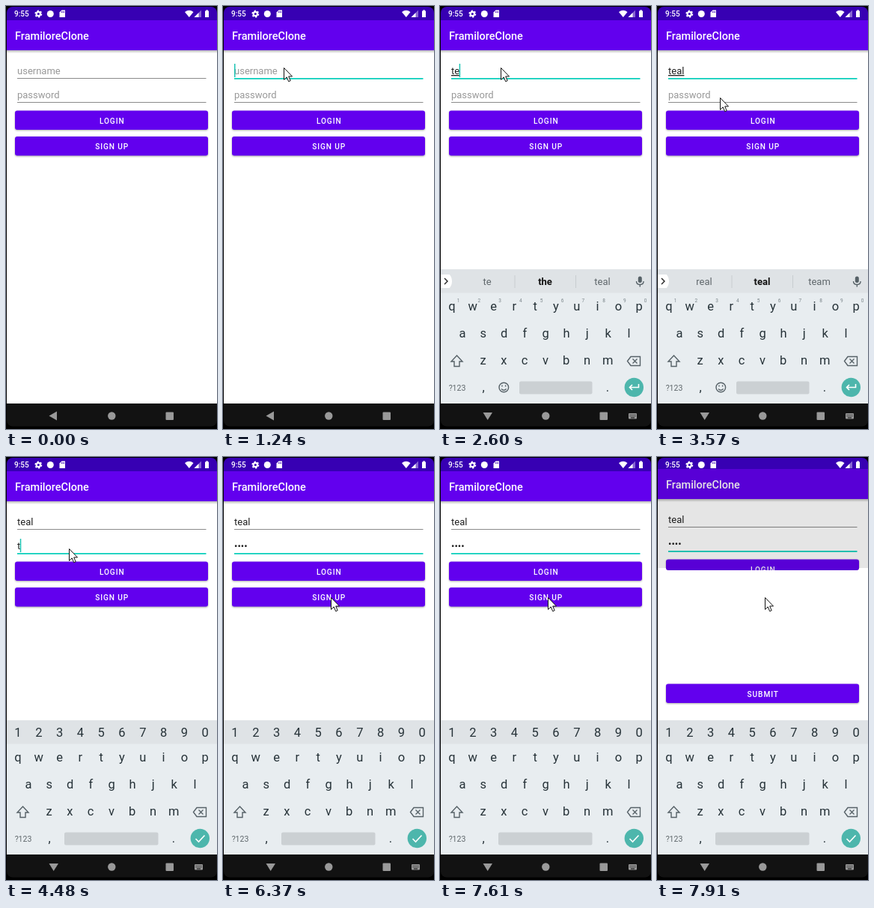
These frames come from a looping animation (282x564 px, 8000 ms). An HTML page:

```html
<!DOCTYPE html>
<html lang="en">
<head>
<meta charset="utf-8">
<style>
  html, body { margin: 0; width: 100%; height: 100%; overflow: hidden; background: #000; }
  svg { display: block; font-family: Roboto, sans-serif; }
  .mid { text-anchor: middle; }
  .title { font-size: 14.5px; font-weight: 500; fill: #fff; }
  .field { font-size: 13px; fill: #202020; }
  .hint { fill: #989898; }
  .button { filter: drop-shadow(0 1px 1px #0005); }
  .label { font-size: 10.15px; font-weight: 500; letter-spacing: .9px; fill: #fff; }
  .key { font-size: 16.5px; fill: #263238; }
  .word { font-size: 13px; fill: #5f676b; }
  .small { font-size: 6.5px; fill: #7c868b; }
  .line { fill: none; stroke: #566167; stroke-width: 1.4; }
</style>
</head>
<body>
<svg width="282" height="564" viewBox="0 0 282 564">
  <defs>
    <clipPath id="glass"><rect x="1" y="1" width="281" height="559.5" rx="8"/></clipPath>
    <linearGradient id="shade" x2="0" y2="1">
      <stop stop-opacity=".28"/><stop offset="1" stop-opacity="0"/>
    </linearGradient>
  </defs>
  <rect width="282" height="564"/>
  <g clip-path="url(#glass)">
    <rect y="16" width="282" height="515" fill="#fff"/>
    <g id="page">
      <rect y="19" width="282" height="40" fill="#6200ee"/>
      <rect y="59" width="282" height="4" fill="url(#shade)"/>
      <text class="title" x="12" y="45">FramiloreClone</text>
      <g id="form"></g>
    </g>

    <g id="next">
      <rect y="16" width="282" height="135" opacity=".1"/>
      <path d="M0 148H12q0 3 3 3H267q3 0 3-3H282V352H0Z" fill="#fff"/>
      <g id="submit"></g>
    </g>

    <g id="status" fill="#fff">
      <rect width="282" height="19" id="statusBar" fill="#3700b3"/>
      <text x="11" y="14" font-size="10" font-weight="500">9:55</text>
      <g fill="none" stroke="#fff">
        <circle cx="43.3" cy="10.5" r="2.7" stroke-width="2.2"/>
        <circle cx="43.3" cy="10.5" r="4.2" stroke-width="1.6" stroke-dasharray="2.2 2.2"/>
      </g>
      <circle cx="59.3" cy="10.5" r="4.5"/>
      <path d="M74.5 5.5H79V15H71.5V8.5Z"/>
      <path d="M74.4 7v2M76 7v2M77.6 7v2" stroke="#3700b3" stroke-width=".8"/>
      <path d="M239 8Q244.800 3.500 250.500 8L244.800 15Z"/>
      <path d="M261 5.500V15H251.500Z" opacity=".4"/>
      <path d="M257.500 9V15H251.500Z"/>
      <path d="M266 6.500H267.500V5.300H269.700V6.500H271V15H266Z"/>
    </g>

    <rect y="530" width="282" height="34" fill="#121212"/>
    <g fill="#999">
      <path id="back"/>
      <circle cx="141.300" cy="546.500" r="5.200"/>
      <rect x="213.500" y="541.500" width="10.500" height="10.500" rx="1"/>
      <g id="switcher">
        <rect x="252" y="543" width="11" height="7.500" rx="1"/>
        <path d="M253.500 545H262M253.500 547H262" stroke="#121212" stroke-dasharray="1 1"/>
        <path d="M255 549H260" stroke="#121212"/>
      </g>
    </g>

    <g id="keyboard">
      <rect y="351" width="282" height="179" fill="#e8edf0"/>
      <rect y="351" width="282" height="31.500" fill="#dfe3e6"/>
      <g id="keys"></g>
      <g class="line">
        <path d="M22.500 466L30 474H26V480.500H19V474H15Z"/>
        <path d="M250.500 473.500L255 467.500H267.500V479.500H255ZM257.500 470.500l6 6m0-6l-6 6"/>
      </g>
      <text class="word mid" x="23" y="513" style="font-size:10.500px">?123</text>
      <text class="key mid" x="58" y="514">,</text>
      <text class="key mid" x="224" y="514">.</text>
      <rect id="space" y="500.500" height="17" rx="2" fill="#cbd0d3"/>
      <circle cx="259.300" cy="508.500" r="12.700" fill="#4db6ac"/>
      <path id="action" fill="none" stroke="#fff" stroke-width="1.600"/>
      <g id="textMode">
        <circle cx="1" cy="367" r="14" fill="#fff" transform="translate(1 0) scale(1 1)" clip-path="inset(5px 0)"/>
        <path d="M6 363L10 367L6 371" class="line" style="stroke:#222"/>
        <path d="M100 359V376M181.500 359V376" stroke="#c8cdd0"/>
        <g id="words"></g>
        <rect x="264.800" y="360.500" width="5" height="8.500" rx="2.500" fill="#566167"/>
        <path class="line" d="M262.500 367q0 4.500 4.800 4.500t4.800-4.500M267.300 371.500V374.500"/>
        <g id="supers"></g>
        <g class="line">
          <circle cx="85.300" cy="508.500" r="6.300"/>
          <path d="M82 510.500q3.300 3.500 6.600 0M83 505.500v2M87.600 505.500v2"/>
        </g>
      </g>
      <g id="digits"></g>
    </g>
  </g>
  <path id="pointer" d="M.5 .5V16.300L4.200 12.800L6.700 18.700L9.200 17.600L6.700 11.900H11.500Z" fill="#fff" stroke="#111"/>
</svg>

<script>
const $ = id => document.getElementById(id);
const show = (id, on) => $(id).style.display = on ? '' : 'none';
const set = (id, attrs) => { for (const k in attrs) $(id).setAttribute(k, attrs[k]); };
// Value of the latest step that has begun.
const stepAt = (t, steps) => steps.filter(s => s[0] <= t).pop()[1];

const text = (s, x, y, cls) => `<text class="${cls}" x="${x}" y="${y}">${s}</text>`;
const row = (chars, x, y, cls) =>
  [...chars].map((c, i) => text(c, x + i * 27.8, y, cls + ' mid')).join('');
const button = (label, y, id) =>
  `<rect class="button" id="${id}" x="12" y="${y}" width="258" height="25.500" rx="3" fill="#6200ee"/>` +
  text(label, 141.700, y + 17, 'label mid');
const field = (name, y) =>
  `<rect id="${name}Line" x="15" y="${y}" width="252.500"/>` +
  text('', 15, y - 5, 'field').replace('<text', `<text id="${name}"`) +
  `<rect id="${name}Caret" y="${y - 19}" width="1.500" height="18" fill="#1cc4b3"/>`;

$('form').innerHTML = field('username', 96) + field('password', 128) +
  button('LOGIN', 139.500, 'login') + button('SIGN UP', 174, 'signup') +
  '<rect id="ripple" x="12" y="174" width="258" height="25.500" rx="3" fill="#fff"/>';
$('submit').innerHTML = button('SUBMIT', 302.500, 'send');
$('keys').innerHTML = row('qwertyuiop', 16, 406, 'key') +
  row('asdfghjkl', 30, 442, 'key') + row('zxcvbnm', 57.500, 478, 'key');
$('supers').innerHTML = row('1234567890', 24.500, 395, 'small');
$('digits').innerHTML = row('1234567890', 16, 373, 'key');

const pointerSteps = [
  [0, null], [460, [191, 70]], [610, [160, 84]], [730, [112, 102]], [850, [81, 82]],
  [3450, [82, 100]], [3570, [84, 122]], [5560, [121, 158]], [5700, [148, 188]],
  [5830, [161, 197]], [5980, [151, 192]], [6100, [144, 188]], [6370, [144, 187]]
];
const userSteps = [[0, ''], [2480, 't'], [2600, 'te'], [2750, 'tea'], [2870, 'teal']];
const passSteps = [[0, ''], [4480, 't'], [4600, '•e'], [4750, '••a'], [4900, '•••l'], [6370, '••••']];
const wordSteps = [
  [0, 'thanks I we'], [2480, 't the to'], [2600, 'te the teal'],
  [2750, 'tea teal team'], [2870, 'real teal team']
];
const caretSteps = [
  [0, 0], [1120, 1], [1660, 0], [2200, 1], [3450, 0], [3850, 1],
  [5440, 0], [5830, 1], [6370, 0], [6780, 1], [7610, 0]
];
const focusSteps = [[0, ''], [1120, 'username'], [3970, 'password']];
const rippleSteps = [[0, 0], [6780, .08], [6900, .18], [7020, 0]];

function drawField(name, value, focus, caret) {
  const focused = focus === name, el = $(name);
  el.textContent = value || name;
  el.setAttribute('class', value ? 'field' : 'field hint');
  set(name + 'Line', { height: focused ? 1.700 : 1, fill: focused ? '#03cdb9' : '#8a8a8a' });
  set(name + 'Caret', { x: 15 + (value ? el.getComputedTextLength() - .5 : 0) });
  show(name + 'Caret', focused && caret);
}

function render(t) {
  const focus = stepAt(t, focusSteps), caret = stepAt(t, caretSteps);
  drawField('username', stepAt(t, userSteps), focus, caret);
  drawField('password', stepAt(t, passSteps), focus, caret);
  set('username', { 'text-decoration': t >= 2480 && t < 3970 ? 'underline' : 'none' });

  const ripple = stepAt(t, rippleSteps);
  set('ripple', { opacity: ripple });
  $('signup').style.filter = ripple ? 'drop-shadow(0 2px 2px #0006)' : '';

  const rising = t < 1660, digits = t >= 4090;
  show('keyboard', t >= 1510);
  set('keyboard', { transform: `translate(0 ${rising ? 6 : 0})`, opacity: rising ? .86 : 1 });
  show('textMode', !digits);
  show('digits', digits);
  set('space', digits ? { x: 78, width: 125.500 } : { x: 106, width: 97.500 });
  set('action', { d: digits ? 'M253.500 509L257.500 513L265.500 504.500'
    : 'M265.500 504V508.500H253.500M257 505L253.500 508.500L257 512' });
  $('words').innerHTML = stepAt(t, wordSteps).split(' ').map((w, i) =>
    text(w, [63, 140.500, 217][i], 371.500, 'word mid')).join('');
  if (t >= 2480) $('words').children[1].style.cssText = 'font-weight:700;fill:#111';

  const nav = t >= 1360;
  show('switcher', nav);
  set('back', { d: nav ? 'M57.500 542H70L63.700 552Z' : 'M57.500 546.500L68 540.500V552.500Z' });

  const opening = t >= 7910;
  show('next', opening);
  set('page', { transform: `translate(0 ${opening ? -3 : 0})` });
  set('statusBar', { height: opening ? 16 : 19 });

  const p = stepAt(t, pointerSteps);
  show('pointer', p);
  if (p) set('pointer', { transform: `translate(${p})` });
}

(function tick() {
  render(performance.now() % 8000);
  requestAnimationFrame(tick);
})();
</script>
</body>
</html>
```
